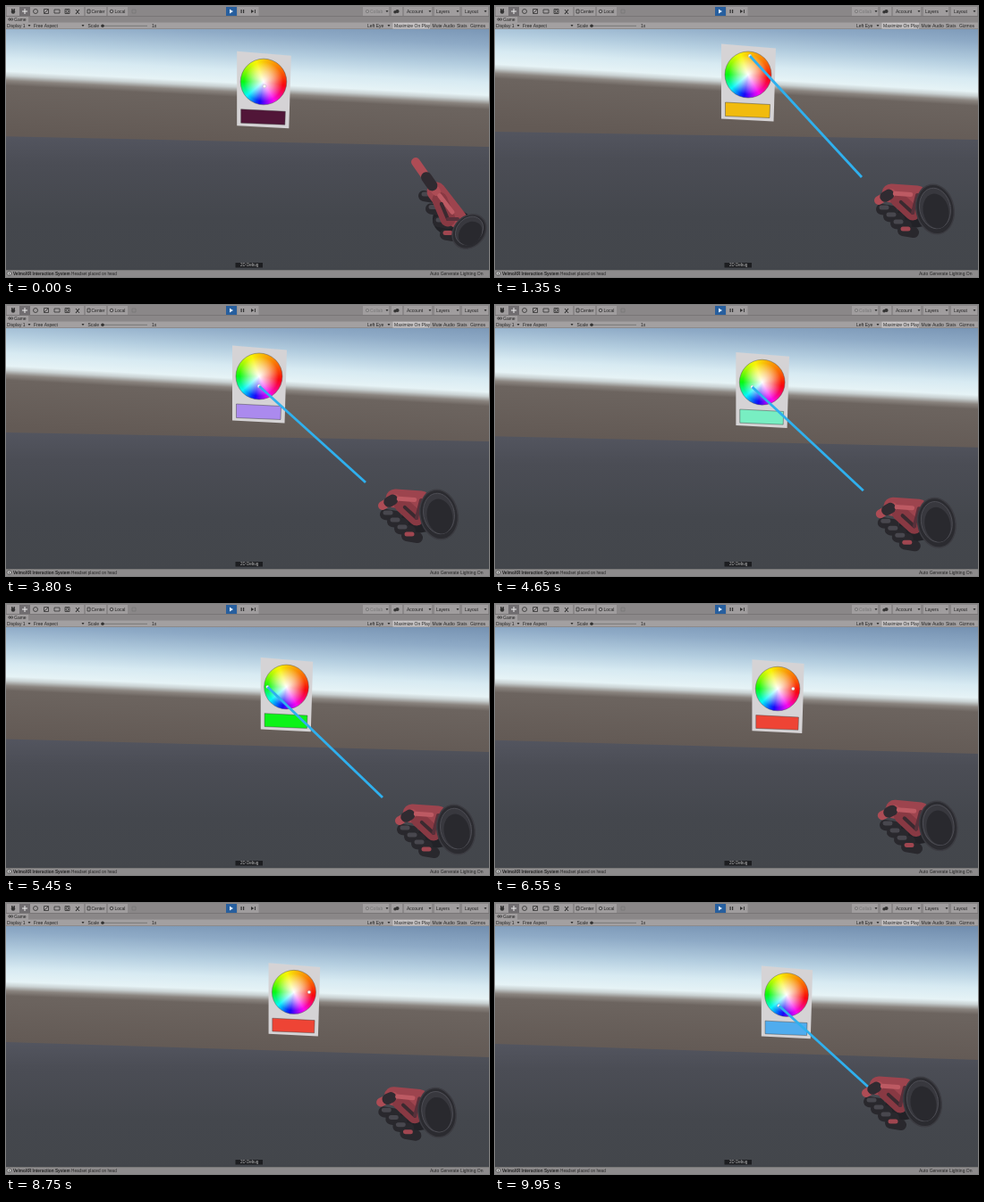
Recreate the animation shown at these times as an HTML page with a canvas. Size 540 by 304 pixels, loop 10000 ms.

```html
<!DOCTYPE html>
<html lang="en">
<head>
<meta charset="utf-8">
<title>Colour picker in a headset view</title>
<style>
  html, body { margin: 0; width: 100%; height: 100%; overflow: hidden; background: #8b8889; }
  canvas { display: block; width: 540px; height: 304px; }
</style>
</head>
<body>
<canvas id="stage" width="540" height="304"></canvas>
<script>
const ctx = document.getElementById('stage').getContext('2d');
const LOOP = 10000, STEP = 50, RADIUS = 26, GRIP_TIME = 250;
const INK = '#333', BUTTON = '#a09d9e';

// time, wheel centre, cuff of the glove, picked point relative to the wheel
const POSES = [
  [0, 288, 85, 518, 253, 1, 5],
  [1350, 283, 77, 492, 228, 2, -21],
  [2700, 283, 76.5, 486, 222, 2, -26],
  [3800, 283, 80, 484, 235, 0, 11],
  [5450, 313.5, 93, 503, 253, -22, 0],
  [6525, 316, 95, 496, 249, 18, 0],
  [7600, 319, 97, 485, 245, 18, 0],
  [8775, 322, 100, 482, 235, 18, 0],
  [9950, 326, 103, 478, 223, -9, 13]
];

// while the trigger is held a beam starts at this offset from the cuff
const HOLDS = [
  { from: 675, to: 6525, dx: -82, dy: -36 },
  { from: 8775, to: LOOP, dx: -60, dy: -16 }
];

const mix = (a, b, k) => a + (b - a) * k;
const clamp = (v, low, high) => Math.min(high, Math.max(low, v));
const ease = k => k * k * (3 - 2 * k);

function poseAt(t) {
  const i = Math.max(1, POSES.findIndex(p => p[0] >= t));
  const a = POSES[i - 1], b = POSES[i] || a;
  const k = clamp((t - a[0]) / (b[0] - a[0]), 0, 1);
  return a.map((v, n) => mix(v, b[n], k));
}

function gripAt(t) {
  return Math.max(...HOLDS.map(({ from, to }) =>
    ease(clamp(Math.min(t - from + GRIP_TIME, to + GRIP_TIME - t) / GRIP_TIME, 0, 1))));
}

// hue by clockwise turn from the right side, warm colours spread wider than cold ones
function wheelHue(turn) {
  const angle = turn * 2 * Math.PI;
  return 365 - 360 * turn - 31 * (1 - Math.cos(angle)) + 16 * Math.sin(angle);
}

function wheelColor(x, y) {
  const turn = (Math.atan2(y, x) / (2 * Math.PI) + 1) % 1;
  const r = Math.min(1, Math.hypot(x, y) / RADIUS);
  return `hsl(${wheelHue(turn)} ${60 + 36 * r}% ${Math.max(50, 100 - 62 * r)}%)`;
}

function addStops(gradient, stops) {
  stops.forEach(([at, color]) => gradient.addColorStop(at, color));
  return gradient;
}

function paint(fill, stroke, width = .8) {
  if (fill) { ctx.fillStyle = fill; ctx.fill(); }
  if (stroke) { ctx.strokeStyle = stroke; ctx.lineWidth = width; ctx.stroke(); }
}

function polygon(points, fill, stroke) {
  ctx.beginPath();
  points.forEach(p => ctx.lineTo(...p));
  ctx.closePath();
  paint(fill, stroke);
}

function oval(x, y, rx, ry, turn, fill, stroke, width) {
  ctx.beginPath();
  ctx.ellipse(x, y, rx, ry, turn, 0, 2 * Math.PI);
  paint(fill, stroke, width);
}

const disc = (x, y, r, fill, stroke) => oval(x, y, r, r, 0, fill, stroke);

function line(x1, y1, x2, y2, width, color) {
  ctx.beginPath();
  ctx.moveTo(x1, y1);
  ctx.lineTo(x2, y2);
  paint(null, color, width);
}

function box(x, y, w, h, fill, stroke) {
  ctx.beginPath();
  ctx.rect(x, y, w, h);
  paint(fill, stroke);
}

function label(text, x, y, color = '#222', font = '5px') {
  ctx.font = `${font} "Liberation Sans", Arial, sans-serif`;
  ctx.fillStyle = color;
  ctx.fillText(text, x, y);
}

// the backdrop follows the panel, since both move with the head
function drawWorld(tilt) {
  const skyL = 74 + tilt, skyR = 105 + tilt * .5;
  const floorL = 141 + tilt * .65, floorR = 150 + tilt;
  ctx.save();
  ctx.transform(1, (skyR - skyL) / 540, 0, 1, 0, skyL);
  box(0, -130, 540, 260, addStops(ctx.createLinearGradient(0, -100, 0, 60), [
    [0, '#6884a6'], [.22, '#8eaac6'], [.36, '#b3cddf'], [.48, '#d7eaf2'], [.57, '#e6f3f6'],
    [.6, '#c9d1d2'], [.635, '#8a847f'], [.67, '#6c645f'], [1, '#635a55']]));
  ctx.restore();
  polygon([[0, floorL], [540, floorR], [540, 304], [0, 304]],
    addStops(ctx.createLinearGradient(0, floorL, 0, 300), [
      [0, '#53555f'], [.2, '#4b4d55'], [.6, '#44474d'], [1, '#43464b']]));
}

function drawPanel(x, y, scale, pick, swatch) {
  ctx.save();
  ctx.translate(x, y);
  ctx.scale(scale, scale);
  polygon([[-30, -34.5], [31, -29.5], [28.5, 52.5], [-30, 49.5]], '#d5d3d5');
  const hues = ctx.createConicGradient(0, 0, 0);
  for (let i = 0; i <= 36; i++) hues.addColorStop(i / 36, `hsl(${wheelHue(i / 36)} 95% 50%)`);
  disc(0, 0, RADIUS, hues);
  disc(0, 0, RADIUS, addStops(ctx.createRadialGradient(0, 0, 0, 0, 0, RADIUS), [
    [0, '#fff'], [.45, '#ffffff80'], [.85, '#fff0']]), '#5559');
  polygon([[-25.5, 31], [24.5, 33.5], [24, 48.5], [-25.5, 46.5]], swatch, '#4449');
  disc(...pick, 1.9, '#fff', '#8886');
  ctx.restore();
}

function drawGlove(x, y, grip) {
  const at = (pointX, pointY, fistX, fistY) => [mix(pointX, fistX, grip), mix(pointY, fistY, grip)];
  const limb = (a, b, width, color) => line(...a, ...b, width, color);
  const between = (a, b, k) => [mix(a[0], b[0], k), mix(a[1], b[1], k)];
  const knuckle = at(-37, -45, -49, -18), tip = at(-60, -78, -63, -10);
  const wrist = at(-13, -14, -20, -16), palm = at(-24, -14, -25, 4);

  ctx.save();
  ctx.translate(x, y);
  ctx.rotate((x - 518) * .0045 * (1 - grip));
  ctx.lineCap = 'round';
  limb(palm, [-4, 0], 34, '#222227');
  for (let i = 0; i < 4; i++) {
    const [fx, fy] = at(-51 + 8 * i, -40 + 14.5 * i, -60 + 8 * i, 8 * i);
    line(fx, fy, fx + 12, fy + 2, 12, '#29282d');
    line(fx, fy - 2, fx + 6, fy - 2, 5, i === 3 ? '#a04650' : '#48474e');
  }
  limb(knuckle, wrist, 21, '#9d444e');
  limb(between(knuckle, palm, .3), palm, 17, '#883943');
  limb(knuckle, tip, 10, '#ad4c55');
  limb(between(knuckle, tip, .2), between(knuckle, tip, .48), 12, '#302b31');
  limb(between(knuckle, wrist, .15), between(knuckle, wrist, .75), 5, '#bd5a63');
  limb(between(knuckle, palm, .45), palm, 4, '#3a2a30');
  limb(palm, wrist, 4, '#58303a');

  const rx = mix(17, 21, grip), ry = mix(21, 28, grip), lean = mix(.75, -.2, grip);
  oval(0, 0, rx, ry, lean, '#2b2b30', '#3c3c42', 1.5);
  oval(0, -1, rx * .82, ry * .82, lean, '#38383e', '#4d4d54', 1);
  oval(1, 2, rx * .68, ry * .7, lean, '#29292e');
  ctx.restore();
}

const drawArrow = (x, y) => polygon([[x - 1.5, y - 1], [x + 1.5, y - 1], [x, y + 1.2]], INK);

function drawToolIcons() {
  box(15, 1, 12, 10, '#706d70');
  disc(8, 6.5, 2.2, INK);
  for (let d = -1.5; d <= 1.5; d += 1.5) line(8 + d, 6, 8 + d, 3, .9, INK);
  line(18, 6, 24, 6, 1, '#eee');
  line(21, 3, 21, 9, 1, '#eee');
  disc(33, 6, 2.5, null, INK);
  box(42.5, 3.5, 5, 5, null, INK);
  line(43, 8, 47, 4, .8, INK);
  box(54, 4, 6, 4, null, INK);
  box(66, 3.5, 5, 5, null, INK);
  disc(68.5, 6, 1.5, null, INK);
  line(78, 9, 82, 4, 1.2, INK);
  line(78, 4, 82, 9, 1, INK);
  box(91, 4, 3, 4, null, INK);
  disc(118, 6, 1.8, null, INK);
  box(141, 4, 4, 4, null, '#777');
}

function drawPlayControls() {
  box(246, 1, 12, 10, '#275f9e');
  box(258.5, 1, 24, 10, BUTTON);
  polygon([[250, 3.5], [254, 6], [250, 8.5]], '#e0ecfa');
  box(262.5, 4, 1.2, 4, INK);
  box(265, 4, 1.2, 4, INK);
  polygon([[274, 4], [277.3, 6], [274, 8]], INK);
  box(278, 4, .9, 4, INK);
}

function drawEditor() {
  box(0, 0, 540, 19, '#8a8788');
  box(0, 11, 540, .7, '#737072');
  box(0, 12, 25, 7, BUTTON);
  box(0, 18.5, 540, 7.5, '#a3a0a1');
  box(0, 25.5, 540, .6, '#777');
  [[1, 86], [89, 23], [114, 22], [399, 29], [431, 12], [445, 31], [479, 28], [510, 29]]
    .forEach(([x, w]) => box(x, 1, w, 10, BUTTON));
  drawToolIcons();
  drawPlayControls();
  label('Center', 95.5, 8);
  label('Local', 121.5, 8);
  disc(404, 6, 1.7, null, '#777');
  label('Collab', 407, 8, '#777');
  disc(435, 6.7, 1.7, INK);
  disc(437.5, 6, 2.1, INK);
  label('Account', 448, 8);
  label('Layers', 481, 8);
  label('Layout', 513, 8);
  [426, 474, 505, 536].forEach(x => drawArrow(x, 6));
  disc(4, 15, 1.2, null, INK);
  disc(6.5, 15, 1.2, null, INK);
  label('Game', 9, 17);

  box(432.5, 18.8, 41.5, 6.8, '#c5c2c3');
  [['Display 1', 1], ['Free Aspect', 31], ['Scale', 91.5], ['1x', 163], ['Left Eye', 404],
    ['Maximize On Play', 434], ['Mute Audio', 476.5], ['Stats', 504], ['Gizmos', 519]]
    .forEach(([text, x]) => label(text, x, 24));
  [26, 86, 428].forEach(x => drawArrow(x, 22));
  line(107, 22.3, 158, 22.3, 1, '#777');
  disc(108, 22.3, 1.8, INK);

  box(256.5, 288, 30.5, 5.5, '#1d1e21');
  label('2D Debug', 262, 292.3, '#bbb', '4.5px');
  box(0, 296, 540, 8, '#8d8b8c');
  box(0, 296, 540, .6, '#666');
  disc(3.5, 300, 2.3, '#eee', '#444');
  box(3.1, 298.7, .9, 2.7, INK);
  label('VelmoXR Interaction System', 8, 302, '#222', 'bold 4.7px');
  label('Headset placed on head', 73, 302, '#222', '4.7px');
  label('Auto Generate Lighting On', 474, 302);
}

function draw(t) {
  const [, x, y, handX, handY, ...pick] = poseAt(t);
  const scale = 1 - (x - 283) * .0014;
  const touched = t >= HOLDS[0].from;
  const hold = HOLDS.find(h => t >= h.from && t < h.to);
  ctx.lineCap = 'butt';
  drawWorld(y - 77);
  drawPanel(x, y, scale, pick, touched ? wheelColor(...pick) : '#511638');
  if (hold) {
    line(handX + hold.dx, handY + hold.dy, x + pick[0] * scale, y + pick[1] * scale, 2.8, '#2fb0ee');
  }
  drawGlove(handX, handY, gripAt(t));
  drawEditor();
}

const start = performance.now();
function frame() {
  const t = (performance.now() - start) % LOOP;
  draw(Math.floor(t / STEP) * STEP);
  requestAnimationFrame(frame);
}
frame();
</script>
</body>
</html>
```
